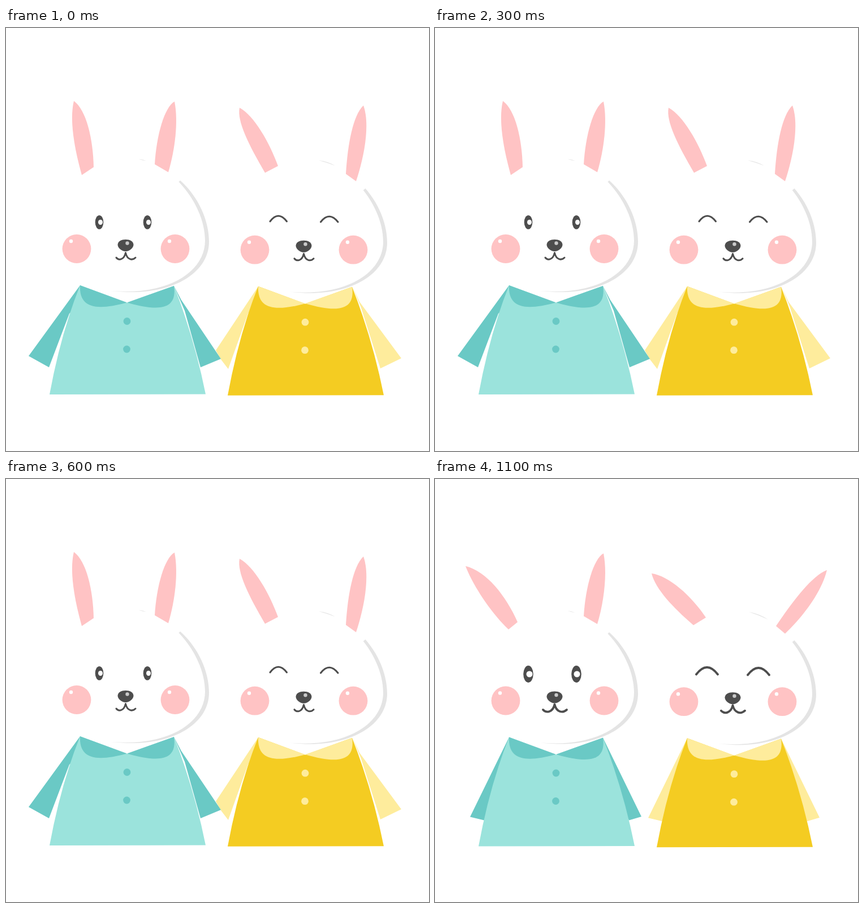
Animation, 748 px wide and 748 px high, one loop 1.3 s. Source, as an HTML page without scripts:

```html
<!DOCTYPE html>
<html lang="en">
<head>
<meta charset="utf-8">
<title>Two bunnies</title>
<style>
html, body { margin: 0; width: 100%; height: 100%; overflow: hidden; background: #fff; }
svg { display: block; width: 100vw; height: 100vh; }

.teal { --dress: #9be3dc; --trim: #6ac9c5; }
.gold { --dress: #f4cc22; --trim: #feec9c; }
.dress { fill: var(--dress); }
.trim { fill: var(--trim); }
.pink { fill: #ffc3c4; }
.shade { fill: #e4e4e4; }
.dark { fill: #4d4d4d; }
.white { fill: #fff; }
.line { fill: none; stroke: #4d4d4d; stroke-width: 3; stroke-linecap: round; stroke-linejoin: round; }
.bold { stroke-width: 3.8; }

/* both poses switch hard at 200, 300, 400, 600 and 800 ms */
.rest { animation: rest 1300ms step-end infinite; }
.wave { animation: wave 1300ms step-end infinite; }
@keyframes rest {
  0%, 23.0769%, 46.1538% { visibility: visible; }
  15.3846%, 30.7692%, 61.5385%, 100% { visibility: hidden; }
}
@keyframes wave {
  0%, 23.0769%, 46.1538% { visibility: hidden; }
  15.3846%, 30.7692%, 61.5385%, 100% { visibility: visible; }
}
</style>
</head>
<body>
<svg viewBox="0 0 748 748">
  <defs>
    <path id="head" class="shade" d="M308 269.5C340 298 359 340 359 378C359 428 305 469 215 467L185 465L215 466C300 465 352 425 352 376C352 342 335 303 305.500 272Z"/>

    <g id="body">
      <path class="dress" d="M131 455L214 486L297 456Q333 548 353 647.500L77 648Q97 540 131 455Z"/>
      <path class="trim" d="M131 455L214 485.500C160 500 129 496 131 455Z"/>
      <path class="trim" d="M297 456L214 485.500C272 502 303 498 297 456Z"/>
      <circle class="trim" cx="214" cy="518.500" r="6.400"/>
      <circle class="trim" cx="213.500" cy="568" r="6.400"/>
    </g>

    <g id="face">
      <circle class="pink" cx="125" cy="390.500" r="25.400"/>
      <circle class="pink" cx="299" cy="390.500" r="25.400"/>
      <circle class="white" cx="115" cy="377" r="3.200"/>
      <circle class="white" cx="289" cy="377" r="3.200"/>
      <path class="dark" d="M197.500 383C198 377 204 374 211.500 374S225 377 225.500 383C225.500 389 218 395 211.500 395S197.500 389 197.500 383Z"/>
      <circle cx="214.500" cy="380.500" r="3.200" fill="#c9c9c9"/>
    </g>

    <path id="smile" class="line" d="M195 406C199 411 208.500 411 211.500 397.500C214.500 411 224 411 229 406"/>
    <path id="grin" class="line bold" d="M191 406.500C197 413 208.500 411 211.500 397C214.500 411 226 413 233 406.500"/>
    <path id="sleeves" class="trim" d="M131 455L62 596L87 602L140 500ZM297 456L365 595.500L343 602L290 500Z"/>
    <path id="gap" class="white" d="M612 276L628 290L641 279L625 262Z"/>
  </defs>

  <g class="rest">
    <g class="gold">
      <path class="trim" d="M446 457L371 570L380 586L393 603L428 505L450 480Z"/>
      <path class="trim" d="M613 458L625 484L699 584L662 602L628 495Z"/>
      <g transform="translate(315 1.700)">
        <use href="#head"/><use href="#body"/><use href="#face"/><use href="#smile"/>
      </g>
      <use href="#gap"/>
      <path class="shade" d="M553 234Q570 236 582 243.500Q568 238 553 234Z"/>
      <path class="pink" d="M413 141C408 165 430 208 458 256L481 244C466 203 439 155 413 141Z"/>
      <path class="pink" d="M632 137C613 155 604 208 601 258L619 271C636 220 643 167 632 137Z"/>
      <path class="line" d="M467 342Q481.500 322.500 496.500 342M556.500 343Q571.500 323.500 587 343"/>
    </g>
    <g class="teal">
      <path class="trim" d="M131 455L40 580L76 600L112 505L140 480Z"/>
      <path class="trim" d="M297 456L310 481L380 585L344 600L316 500Z"/>
      <use href="#head"/><use href="#body"/><use href="#face"/><use href="#smile"/>
      <path class="shade" d="M234 231.500Q242 232 248 235Q241 234 234 231.500Z"/>
      <path class="pink" d="M120 129C113 158 118 203 134 260L155 246C154 196 142 145 120 129Z"/>
      <path class="pink" d="M298 130C280 140 266 190 263 241L287 255C299 215 305 165 298 130Z"/>
      <ellipse class="dark" cx="165" cy="343.500" rx="7.300" ry="12.300"/>
      <ellipse class="dark" cx="250" cy="343.500" rx="7.300" ry="12.300"/>
      <ellipse class="white" cx="167" cy="343.500" rx="4" ry="4.500"/>
      <ellipse class="white" cx="252" cy="343.500" rx="4" ry="4.500"/>
    </g>
  </g>

  <g class="wave">
    <g class="gold">
      <g transform="translate(315 3.200)">
        <use href="#sleeves"/><use href="#head"/><use href="#body"/><use href="#face"/><use href="#grin"/>
      </g>
      <use href="#gap" y="1.500"/>
      <path class="shade" d="M555 235Q573 238 589 248.500Q572 240.500 555 235Z"/>
      <path class="pink" d="M383 167C390 196 425 231 457 258.500L479 245C453 206 413 171 383 167Z"/>
      <path class="pink" d="M693 161C667 171 634 214 603 260L619 273.500C652 242 684 199 693 161Z"/>
      <path class="line bold" d="M462 345.500Q481 320.500 500 345.500M553 346.500Q572 321.500 591 346.500"/>
    </g>
    <g class="teal">
      <g transform="translate(0 1.500)">
        <use href="#sleeves"/><use href="#head"/><use href="#body"/><use href="#face"/><use href="#grin"/>
        <path class="shade" d="M234 231.500Q242 232 248 235Q241 234 234 231.500Z"/>
        <path class="pink" d="M298 130C280 140 266 190 263 241L287 255C299 215 305 165 298 130Z"/>
      </g>
      <path class="pink" d="M54 154C66 186 98 236 130 266L146 253C125 206 91 163 54 154Z"/>
      <ellipse class="dark" cx="165" cy="345" rx="8.800" ry="15"/>
      <ellipse class="dark" cx="250" cy="345" rx="8.800" ry="15"/>
      <circle class="white" cx="167" cy="345" r="5.500"/>
      <circle class="white" cx="251" cy="345" r="5.500"/>
    </g>
  </g>
</svg>
</body>
</html>
```
